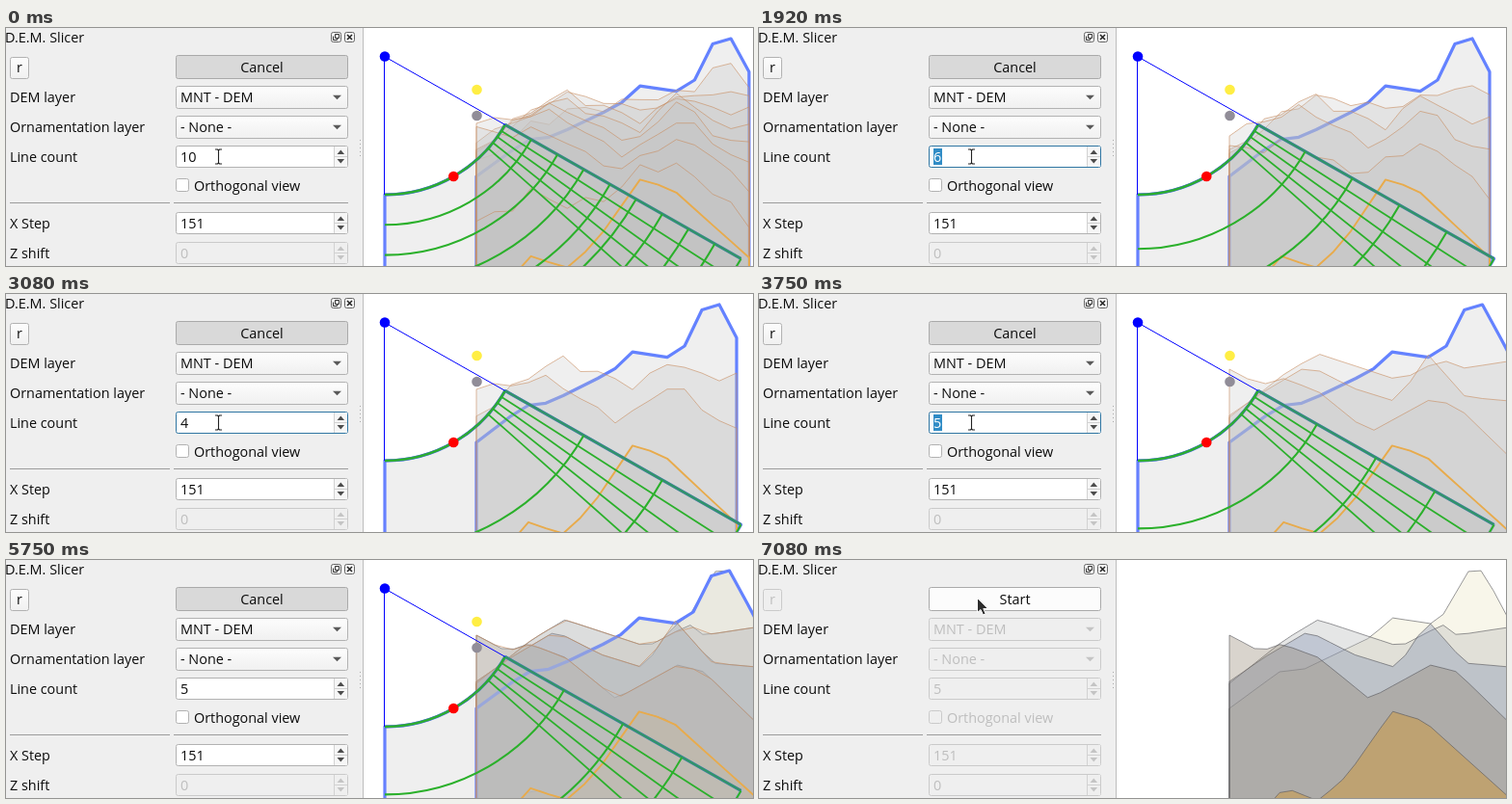
An HTML page that plays this animation: 775x247 px, repeating every 8000 ms.

```html
<!DOCTYPE html>
<html lang="en">
<head>
<meta charset="utf-8">
<title>D.E.M. Slicer</title>
<style>
html, body { margin: 0; width: 100%; height: 100%; overflow: hidden; background: #fff; }
svg { display: block; width: 775px; height: 247px; }
text { font: 500 14.4px "Open Sans", "Noto Sans", sans-serif; white-space: pre; }
</style>
</head>
<body>
<svg viewBox="0 0 775 247" xmlns="http://www.w3.org/2000/svg">
  <defs>
    <linearGradient id="face" x1="0" y1="0" x2="0" y2="1">
      <stop offset="0" stop-color="#fdfdfd"/><stop offset="1" stop-color="#f0f0f0"/>
    </linearGradient>
    <clipPath id="view"><rect x="371" width="404" height="247"/></clipPath>
  </defs>
  <rect width="775" height="247" fill="#fff"/>
  <g id="scene" clip-path="url(#view)"></g>
  <g id="panel"></g>
  <g id="pointer"></g>
</svg>
<script>
const LOOP = 8000, TICK = 1000 / 12;
const FOCUS = 170, BLINK = 750, BLUR = 5000, DONE = 5250, CLOSED = 7080;
const CX = 393, CY = 29.5, R0 = 143.5, R1 = 425;
const TOP_ANGLE = 29.6, RAY_STEP = 3, LEFT = 488;

// Ridges from back to front: slice tint and the corners of the skyline
const RIDGES = [
  { tint: '232,226,190', line: '488,154 540,116 566,113 635,80 657,60 697,66 713,54 734,12 751,11 778,62' },
  { tint: '175,178,178', line: '488,128 545,83 580,62 665,90 709,67 724,78 790,68' },
  { tint: '120,135,170', line: '488,126 526,100 570,74 617,98 662,112 694,63 733,107 790,112' },
  { tint: '140,125,104', line: '488,78 520,95 542,87 580,101 633,144 697,109 724,116 790,180' },
  { tint: '221,139,0', line: '488,300 545,236 580,250 610,224 657,157 690,167 790,257' }
];
for (const r of RIDGES) r.pts = r.line.split(' ').map(p => p.split(',').map(Number));

const $ = id => document.getElementById(id);
const mix = (a, b, f) => a + (b - a) * f;

function heightOn(pts, x) {
  let i = 1;
  while (i < pts.length - 1 && pts[i][0] < x) i++;
  const [x0, y0] = pts[i - 1], [x1, y1] = pts[i];
  return mix(y0, y1, (x - x0) / (x1 - x0));
}

// Skyline height at depth 0 (back) to 1 (front), with a ripple between ridges
function terrain(depth, x) {
  const k = Math.min(3, Math.floor(depth * 4)), f = depth * 4 - k;
  const ripple = 22 * f * (1 - f) * Math.sin(x / 8 + k * 1.7);
  return mix(heightOn(RIDGES[k].pts, x), heightOn(RIDGES[k + 1].pts, x), f) + ripple;
}

function area(depth, step, cols, scale = 1) {
  let d = `M${LEFT} 400`, x = LEFT;
  for (let i = 0; i <= cols; i++) {
    x = LEFT + i * step * scale;
    d += `L${x.toFixed(1)} ${terrain(depth, LEFT + i * step).toFixed(1)}`;
  }
  return d + `L${x.toFixed(1)} 400Z`;
}

const polar = (r, deg) => {
  const a = deg * Math.PI / 180;
  return (CX + r * Math.cos(a)).toFixed(1) + ' ' + (CY + r * Math.sin(a)).toFixed(1);
};
const arc = r => `M${polar(r, TOP_ANGLE)}A${r} ${r} 0 0 1 ${polar(r, 90)}`;
const ray = deg => `M${polar(R0, deg)}L${polar(R1, deg)}`;
const path = (d, stroke, width, fill = 'none') =>
  `<path d="${d}" fill="${fill}" stroke="${stroke}" stroke-width="${width}" stroke-linejoin="round"/>`;
const dot = (x, y, fill) => `<circle cx="${x}" cy="${y}" r="5.3" fill="${fill}"/>`;

const slices = () => RIDGES.map((r, i) =>
  path(area(i / 4, 13.05, 23), 'rgba(85,85,90,.75)', 0.8, `rgba(${r.tint},.33)`)).join('');

function preview(n) {
  const haze = 'rgba(190,190,190,.25)', green = '#2bb02b';
  // Counts that do not divide the depth evenly end one column early
  const whole = 8 % (n - 1) === 0;
  const cols = whole ? 16 : 15, scale = whole ? 1 : n > 6 ? 1.006 : 0.96;
  let out = path(`${arc(R0)}A${R1} ${R1} 0 0 0 ${polar(R1, TOP_ANGLE)}Z`.replace('A425', `L${polar(R1, 90)}A425`),
    '#6680ff', 3.2, haze);
  for (let i = 0; i < n; i++) {
    const d = area(i / (n - 1), 18.75, cols, scale);
    if (i === 0) out += path(d, '#6482ff', 3.2, haze);
    else if (i === n - 1) out += path(d, '#e8ab4c', 1.9, haze);
    else out += path(d, 'rgba(200,140,95,.75)', 0.8, haze);
  }
  out += path(arc(R0) + ray(TOP_ANGLE), '#3c8391', 3);
  for (let i = 1; i < n; i++) out += path(arc(mix(R0, R1, i / (n - 1))), green, 2.1);
  for (let k = 1; k < 5; k++) out += path(ray(TOP_ANGLE + RAY_STEP * k), green, 1.8);
  out += path(arc(R0), green, 2) + path(ray(TOP_ANGLE), 'rgba(43,160,80,.75)', 1.5);
  out += path(`M${CX - .5} ${R0 + CY}V${CY}L${polar(R0, TOP_ANGLE)}`, '#00f', 1);
  return out + dot(CX, CY, '#00f') + dot(488.5, 64, '#ffee44') +
    dot(488.5, 91, '#918d98') + dot(464.3, 154, '#f00');
}

const ink = off => off ? '#bebebe' : '#0c0c0c';
const edge = off => off ? '#cacaca' : '#b2b2b2';
const face = (off, fill) => off ? '#efefef' : fill;
const label = (x, y, s, fill = ink(), anchor = 'start') =>
  `<text x="${x}" y="${y}" fill="${fill}" text-anchor="${anchor}">${s}</text>`;
const rect = (x, y, w, h, fill) => `<rect x="${x}" y="${y}" width="${w}" height="${h}" fill="${fill}"/>`;
const box = (x, y, w, h, fill, stroke) =>
  `<rect x="${x + .5}" y="${y + .5}" width="${w - 1}" height="${h - 1}" rx="2" fill="${fill}" stroke="${stroke}"/>`;
const tri = (x, y, w, h, fill) => `<path d="M${x - w} ${y}h${2 * w}l${-w} ${h}z" fill="${fill}"/>`;

const combo = (y, s, off) =>
  box(176, y, 179, 24, face(off, 'url(#face)'), edge(off)) +
  label(181, y + 17, s, ink(off)) + tri(343.5, y + 9.7, 4.5, 4.5, off ? '#c4c4c4' : '#5a5a5a');

function spin(y, s, off, { focus, sel, caret, low } = {}) {
  const arrow = gray => gray ? '#c4c4c4' : '#4c4c4c';
  let out = box(176, y, 179, 23, face(off, '#fff'), focus ? '#2f76a3' : edge(off)) +
    rect(341, y + 1, 13, 21, face(off, '#f6f6f6')) +
    path(`M340.5 ${y + 1}v21M341 ${y + 11.5}h13`, '#d2d2d2', 1) +
    tri(347.3, y + 9, 3.8, -4.5, arrow(off)) + tri(347.3, y + 14, 3.8, 4.5, arrow(off || low));
  if (sel) out += rect(181, y + 3, 9, 17, '#308cc6');
  if (caret) out += rect(198, y + 3, 1, 17, '#111');
  return out + label(181, y + 17, s, sel ? '#fff' : ink(off));
}

function panel(n, focus, sel, caret, off) {
  let out = rect(0, 0, 370, 247, '#efefef') + rect(370, 0, 1, 247, '#bdbdbd');
  for (let y = 116; y < 133; y += 4) out += rect(367, y, 1, 1, '#aaa');
  out += label(-1, 15, 'D.E.M. Slicer');
  out += box(337, 4, 11, 11, '#f4f4f4', '#666') + box(351, 4, 11, 11, '#f4f4f4', '#666');
  out += path('M341.5 6.5h4v4h-4zM339.5 8.5v4h4v-2', '#333', 1) + path('M354 7l5 5M359 7l-5 5', '#222', 1.5);
  out += box(4, 30, 20, 23, face(off, 'url(#face)'), edge(off)) + label(14, 46, 'r', ink(off), 'middle');
  out += box(176, 28, 179, 25, off ? '#fcfcfc' : '#d9d9d9', '#aaa') +
    label(265.5, 46, off ? 'Start' : 'Cancel', ink(), 'middle');
  out += label(4, 77, 'DEM layer') + label(4, 108, 'Ornamentation layer') + label(4, 139, 'Line count') +
    label(4, 208, 'X Step') + label(4, 239, 'Z shift');
  out += combo(60, 'MNT - DEM', off) + combo(91, '- None -', off);
  out += spin(122, n, off, { focus, sel, caret, low: n === 3 });
  out += box(176, 156, 14, 14, face(off, '#fff'), edge(off)) + label(195, 169, 'Orthogonal view', ink(off));
  out += path('M4 181.5H170M174 181.5H355', '#9c9c9c', 1);
  return out + spin(191, 151, off) + spin(222, 0, true);
}

// Line count and whether its text is selected
function count(t) {
  const steps = [[0, 10], [1250, 9], [1420, 8], [1580, 7], [1830, 6], [2250, 5], [2500, 3], [3080, 4], [3170, 5]];
  const [at, n] = steps.filter(s => s[0] <= t).pop();
  return [n, at > 0 && t >= at + 80 && t < BLUR];
}

// The mouse moves along straight glides, refreshed twelve times a second
function mouse(t) {
  const glide = (start, end, x0, y0, x1, y1) => {
    const now = Math.floor((t + 5) / TICK) * TICK;
    const f = Math.max(0, Math.min(1, (now - start) / (end - start)));
    return [Math.round(mix(x0, x1, f)), Math.round(mix(y0, y1, f))];
  };
  if (t < 4170) return glide(3750, 4170, 220, 133, 246, 262);
  if (t >= 5420 && t < 5750) return glide(5420, 5750, 272, 215, 182, -8);
  if (t >= 6500) return glide(6500, 6830, 199, 2, 226, 39);
  return null;
}

function pointer(x, y) {
  const inField = x > 176 && x < 340 && ((y > 121 && y < 145) || (y > 190 && y < 214));
  const beam = 'M-3.5-7.5h2.5l1 1 1-1h2.5M0-6.5v13M-3.5 7.5h2.5l1-1 1 1h2.5';
  const art = inField
    ? path(beam, 'rgba(255,255,255,.8)', 2.6) + path(beam, '#222', 1.1)
    : path('M0 0V15L3.5 12 6 17.5 8.6 16.3 6.3 11H11Z', '#fff', 1, '#2e2e2e');
  return `<g transform="translate(${x + .5} ${y + .5})">${art}</g>`;
}

const shown = {};
function paint(id, make, ...state) {
  const key = state.join();
  if (shown[id] === key) return;
  shown[id] = key;
  $(id).innerHTML = make(...state);
}

function draw(t) {
  const [n, sel] = count(t);
  const off = t >= CLOSED, pos = mouse(t);
  paint('scene', (n, done, off) => (done ? slices() : '') + (off ? '' : preview(n)), n, t >= DONE, off);
  paint('panel', panel, n, t >= FOCUS && t < BLUR, sel, t >= FOCUS && t < BLINK, off);
  paint('pointer', (x, y) => x === undefined ? '' : pointer(x, y), ...(pos || []));
}

const start = performance.now();
function tick() {
  draw((performance.now() - start) % LOOP);
  requestAnimationFrame(tick);
}
tick();
</script>
</body>
</html>
```
